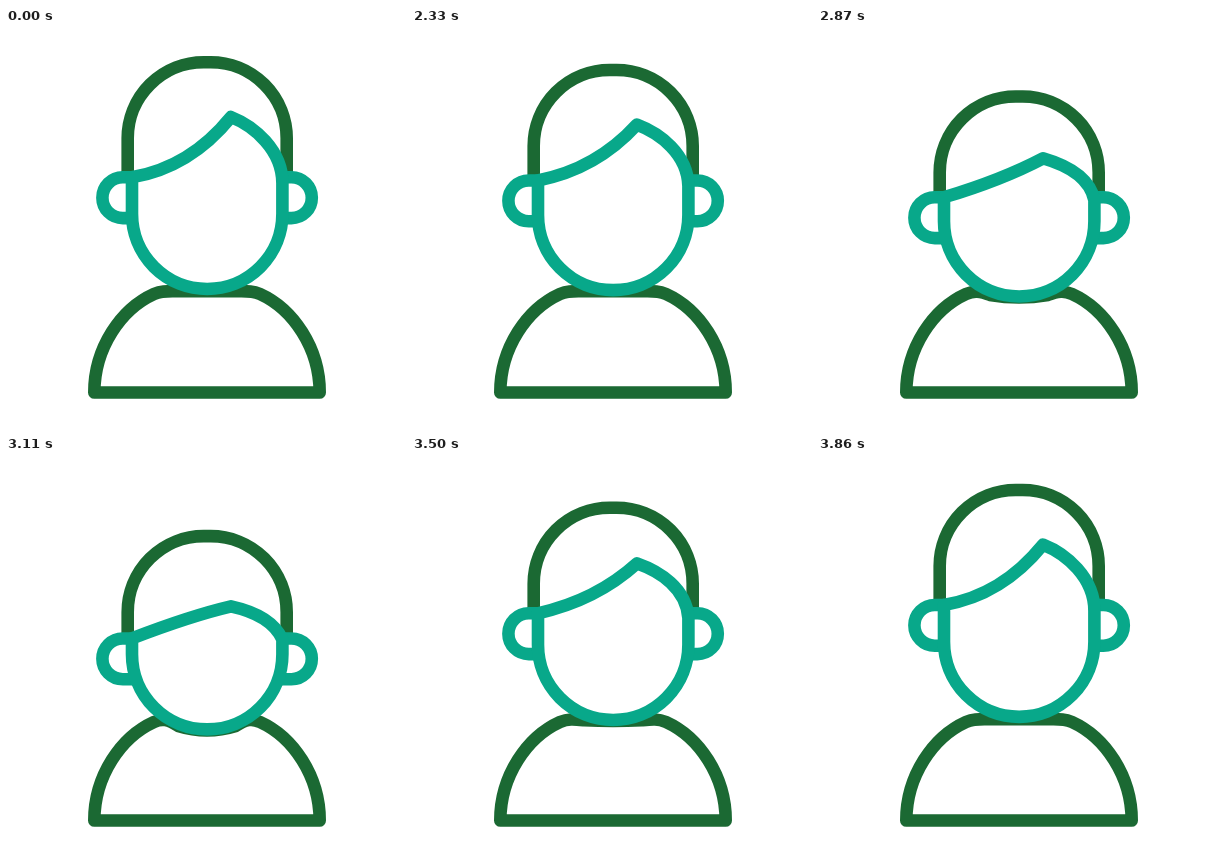
These frames come from a looping animation (400x400 px, 3890 ms). An HTML page:

```html
<!DOCTYPE html>
<html lang="en">
<head>
<meta charset="utf-8">
<title>Nodding avatar</title>
<style>
  html, body { margin: 0; width: 100%; height: 100%; overflow: hidden; background: #fff; }
  svg { display: block; width: 100vw; height: 100vh; }
  path { fill: none; stroke-width: 12.6; stroke-linejoin: round; }
  .dark { stroke: #1b6933; }
  .teal { stroke: #08a88a; }
</style>
</head>
<body>
<svg viewBox="0 0 400 400">
  <path id="body" class="dark"/>
  <path id="hair" class="dark"/>
  <path id="ears" class="teal"/>
  <path id="face" class="teal"/>
</svg>
<script>
const LOOP = 3890;
const CENTER = 201.2, RADIUS = 75.2;
const LEFT = CENTER - RADIUS, RIGHT = CENTER + RADIUS;

const smooth = u => (1 - Math.cos(Math.PI * u)) / 2;
const easeOut = u => Math.sin(Math.PI / 2 * u);

// Turning points of the nod: time in ms, downward shift of the ears, easing into the point
const NOD = [
  [2000, 0],
  [2190, -8, easeOut],
  [2655, 45, smooth],
  [2950, 15, smooth],
  [3234, 45, smooth],
  [3664, -9, smooth],
  [LOOP, 0, smooth]
];

function nodAt(t) {
  if (t <= NOD[0][0]) return 0;
  const i = NOD.findIndex(point => t <= point[0]);
  const [t0, v0] = NOD[i - 1];
  const [t1, v1, ease] = NOD[i];
  return v0 + (v1 - v0) * ease((t - t0) / (t1 - t0));
}

// Shift that grows quickly at first and flattens as the head tips forward
const tilt = (e, gain, limit, upGain) => e < 0 ? e * upGain : gain * e / (1 + e / limit);

const setPath = (id, d) => document.getElementById(id).setAttribute('d', d);

function draw(t) {
  const e = nodAt(t);
  const earTop = 149.3 + e, earBottom = earTop + 40.8;
  const chin = 261 + 0.375 * e;
  const jaw = chin - RADIUS;
  const crown = 34.2 + tilt(e, 2.7, 35, 0.45);
  const tip = 89 + tilt(e, 2.5, 95, 1);
  const bow = 139.5 + 0.62 * e;
  const dip = Math.max(0, chin + 0.9 - 263.2);

  const neck = 263.2 + 0.6 * dip;
  setPath('body', `M88.3 364.5C88.3 320 115 281 148 266C156 262.5 162 263.2 172 ${neck}
    Q201 ${263.2 + 1.4 * dip} 230 ${neck}C240 263.2 246 262.5 254 266C287 281 313.7 320 313.7 364.5Z`);

  setPath('hair', `M121.7 ${earTop}V${crown + 76}A76 76 0 0 1 197.7 ${crown}
    H204.7A76 76 0 0 1 280.7 ${crown + 76}V${earTop}`);

  const drop = Math.max(0, earBottom - jaw);
  const half = Math.sqrt(RADIUS ** 2 - drop ** 2);
  const lowLeft = e > 0 ? CENTER - half : LEFT;
  const lowRight = 2 * CENTER - lowLeft;
  setPath('ears', `M${LEFT} ${earTop}H116.8a20.4 20.4 0 0 0 0 40.8H${lowLeft}
    M${RIGHT} ${earTop}H285.4a20.4 20.4 0 0 1 0 40.8H${lowRight}`);

  setPath('face', `M${LEFT} ${earTop}Q184 ${bow} 225 ${tip}
    C248 ${tip + 9 - 0.12 * e} ${RIGHT - 0.25 * e} ${122 + 1.3 * e} ${RIGHT} ${earTop + 6 - 0.15 * e}
    V${jaw}A${RADIUS} ${RADIUS} 0 0 1 ${LEFT} ${jaw}Z`);
}

const start = performance.now();
function tick() {
  draw((performance.now() - start) % LOOP);
  requestAnimationFrame(tick);
}
draw(0);
requestAnimationFrame(tick);
</script>
</body>
</html>
```
